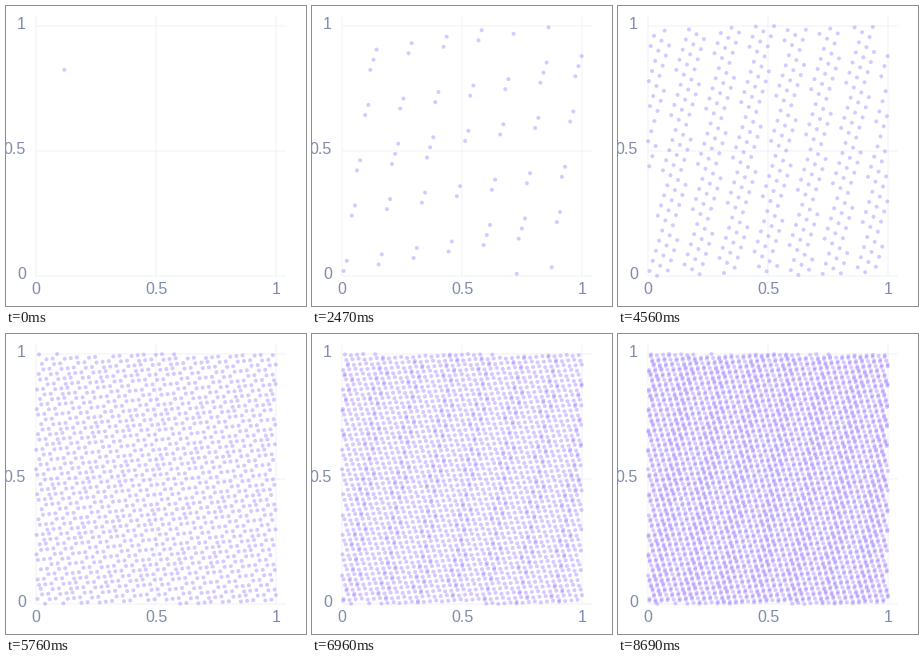
A matplotlib script that plays this animation: 300 px wide and 300 px high, repeating every 8.72 s.

```python
import numpy as np
import matplotlib.pyplot as plt
from matplotlib.animation import FuncAnimation

SIZE, DPI = 300, 100
PX = 72 / DPI                      # one pixel in points
FRAMES, LOOP_MS = 262, 8720
LEFT, RIGHT, TOP, BOTTOM = 30, 270, 20, 270
PAD = 10
GRID, INK, DOT = "#EFF2FA", "#808BAB", "#7b4dff"
RADIUS = 2

GOLDEN = (1 + 5 ** 0.5) / 2
PLASTIC = 1.324717957244746


def to_x(u):
    return LEFT + u * (RIGHT - LEFT)


def to_y(v):
    return BOTTOM - v * (BOTTOM - TOP)


def count(i):
    """Points on show: one at a time, then tens, then twenty-fives."""
    if i < 100:
        return i + 1
    if i < 140:
        return 100 + 10 * (i - 99)
    return 500 + 25 * (i - 139)


# additive recurrence, one irrational step per axis
n = np.arange(1, count(FRAMES - 1) + 1)
points = np.column_stack([to_x((0.5 + n * GOLDEN) % 1),
                          to_y((0.5 + n * PLASTIC) % 1)])

fig = plt.figure(figsize=(SIZE / DPI, SIZE / DPI), dpi=DPI, facecolor="white")
ax = fig.add_axes([0, 0, 1, 1])
ax.set(xlim=(0, SIZE), ylim=(SIZE, 0))
ax.axis("off")


def line(xs, ys):
    ax.plot(xs, ys, color=GRID, lw=PX, solid_capstyle="butt", snap=False, zorder=1)


def label(x, y, text, ha):
    ax.text(x, y, text, ha=ha, va="baseline", color=INK,
            family="Liberation Sans", size=16 * PX, zorder=2)


for value, text in ((0, "0"), (0.5, "0.5"), (1, "1")):
    x, y = to_x(value), to_y(value)
    line([x, x], [TOP - PAD, BOTTOM])
    line([LEFT, RIGHT + PAD], [y, y])
    label(x, BOTTOM + 18, text, "center")
    label(LEFT - PAD, y + 3, text, "right")

# per-point sizes keep sub-pixel placement
sizes = np.full(len(points), (2 * RADIUS * PX) ** 2)
dots = ax.scatter(points[:, 0], points[:, 1], s=sizes, color=DOT, alpha=0.3,
                  linewidths=0, edgecolors="none", snap=False, zorder=3)


def draw(i):
    dots.set_offsets(points[:count(i)])
    return (dots,)


anim = FuncAnimation(fig, draw, frames=FRAMES, init_func=lambda: draw(0),
                     interval=LOOP_MS / FRAMES, repeat=True, repeat_delay=0)
plt.show()
```
